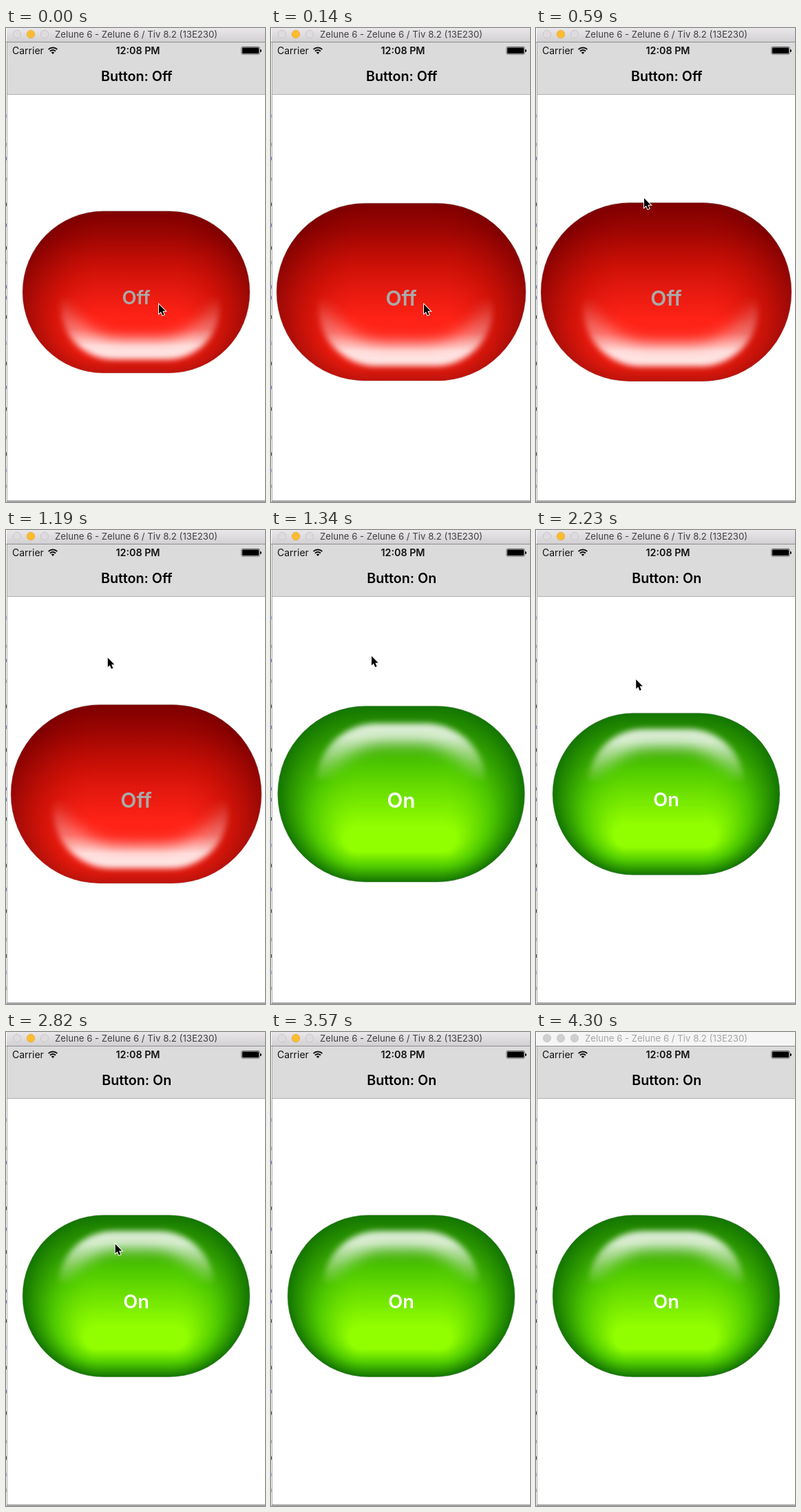
Write an HTML page that moves like this. It is 376 px wide and 688 px high and loops after 4.4 s.

```html
<!DOCTYPE html>
<html lang="en">
<head>
<meta charset="utf-8">
<title>Glossy toggle button</title>
<style>
  html, body { margin: 0; width: 100%; height: 100%; overflow: hidden; background: #fff; }
  svg { display: block; width: 376px; height: 688px; font-family: Inter, Roboto, sans-serif; }
  .mid { text-anchor: middle; }
  .idle .light { fill: #d0cfd0; stroke: #c6c5c6; }
  .idle .bar { fill: #f6f5f6; }
  .idle .caption { fill: #a5a5a5; }
</style>
</head>
<body>
<svg id="stage" viewBox="0 0 376 688">
  <defs>
    <linearGradient id="chrome" x2="0" y2="1">
      <stop stop-color="#e9e7e9"/><stop offset="1" stop-color="#d2d0d2"/>
    </linearGradient>
    <linearGradient id="warm" x2="0" y2="1">
      <stop offset=".15" stop-color="#ff2818" stop-opacity="0"/>
      <stop offset="1" stop-color="#ff2818" stop-opacity=".5"/>
    </linearGradient>
    <linearGradient id="fadeDown" gradientUnits="userSpaceOnUse" x1="0" x2="0" y1="287" y2="368">
      <stop stop-color="#fff" stop-opacity=".86"/>
      <stop offset=".25" stop-color="#fff" stop-opacity=".8"/>
      <stop offset="1" stop-color="#fff" stop-opacity="0"/>
    </linearGradient>
    <linearGradient id="fadeUp" gradientUnits="userSpaceOnUse" x1="0" x2="0" y1="486" y2="388">
      <stop stop-color="#fff" stop-opacity=".92"/>
      <stop offset=".25" stop-color="#fff" stop-opacity=".85"/>
      <stop offset=".5" stop-color="#fff" stop-opacity=".38"/>
      <stop offset="1" stop-color="#fff" stop-opacity="0"/>
    </linearGradient>
    <filter id="soft" filterUnits="userSpaceOnUse" x="0" y="220" width="376" height="320" color-interpolation-filters="sRGB">
      <feGaussianBlur stdDeviation="4"/>
    </filter>
    <filter id="softer" filterUnits="userSpaceOnUse" x="0" y="220" width="376" height="320" color-interpolation-filters="sRGB">
      <feGaussianBlur stdDeviation="10"/>
    </filter>
    <mask id="topGlow" maskUnits="userSpaceOnUse" x="24" y="266" width="330" height="234">
      <rect x="76" y="289" width="226" height="160" rx="80" fill="#fff" filter="url(#soft)"/>
      <rect x="85" y="318" width="208" height="180" rx="84" filter="url(#softer)"/>
    </mask>
    <mask id="lowGlow" maskUnits="userSpaceOnUse" x="24" y="266" width="330" height="234">
      <rect x="80" y="328" width="230" height="153" rx="76" fill="#fff" filter="url(#soft)"/>
      <rect x="88" y="270" width="214" height="178" rx="82" filter="url(#softer)"/>
    </mask>
  </defs>

  <rect width="376" height="688" fill="#fff"/>
  <g id="behind"></g>
  <path d="M1.5 20V687" stroke="#a9a9a9"/>

  <rect class="bar" x="1" width="375" height="20" fill="url(#chrome)"/>
  <g stroke-width=".8">
    <circle class="light" cx="16" cy="9" r="5.7" fill="#dddbdd" stroke="#c3c1c3"/>
    <circle class="light" cx="36" cy="9" r="5.7" fill="#fdbc2f" stroke="#e6a73a"/>
    <circle class="light" cx="56" cy="9" r="5.7" fill="#dddbdd" stroke="#c3c1c3"/>
  </g>
  <text class="caption" x="71" y="14" font-size="13.2" fill="#404040">Zelune 6 - Zelune 6 / Tiv 8.2 (13E230)</text>

  <rect x="2" y="20" width="374" height="76" fill="#dbdbdb"/>
  <path d="M0 20.5H376" stroke="#8f8f8f"/>
  <path d="M2 96.5H376" stroke="#b2b2b2"/>
  <text x="9" y="38" font-size="14" fill="#111">Carrier</text>
  <g fill="none" stroke="#111" stroke-width="2">
    <path d="M61.6 31.1a9 9 0 0 1 12.8 0M64 33.8a5.6 5.6 0 0 1 8 0"/>
    <path d="M68 38l-2.3-2.4a3.2 3.2 0 0 1 4.6 0z" fill="#111" stroke="none"/>
  </g>
  <text class="mid" x="191.5" y="38" font-size="14.3" font-weight="600" fill="#111">12:08 PM</text>
  <rect x="341.9" y="27.4" width="26.2" height="10.7" rx="1.8" fill="none" stroke="#222" stroke-width=".7"/>
  <rect x="343" y="28.5" width="24" height="8.5" rx="1"/>
  <path d="M369 31a2 2 0 0 1 0 4z"/>
  <text id="heading" class="mid" x="189.7" y="77" font-size="19.7" font-weight="600"></text>

  <g id="button">
    <g id="red"></g>
    <g id="green"></g>
    <text id="label" class="mid" x="189" y="401" font-size="27.3" font-weight="600"></text>
  </g>

  <path d="M1 686.5H376" stroke="#777"/>
  <path d="M0 687.5H376" stroke="#c4c4c4"/>
  <path id="cursor" d="M1 1V14.6L4 11.8L6.2 17L8.6 16L6.4 10.8H10.6Z" stroke="#fff" stroke-width="1.9" paint-order="stroke"/>
</svg>
<script>
const LOOP = 4400, PRESS = 140, BEAT = 148.8, IDLE = 4300;
const RELEASE = 9, LEAVE = 24; // in beats
const RINGS = 90, RIM = [24, 265.7, 354, 500.7];
const $ = id => document.getElementById(id);
const mix = (a, b, t) => a + (b - a) * t;

function add(parent, tag, attrs) {
  const el = document.createElementNS('http://www.w3.org/2000/svg', tag);
  for (const k in attrs) el.setAttribute(k, attrs[k]);
  parent.append(el);
}

function ramp(colors, t) {
  const p = t * (colors.length - 1), i = Math.min(colors.length - 2, Math.floor(p));
  return `rgb(${colors[i].map((c, k) => Math.round(mix(c, colors[i + 1][k], p - i)))})`;
}

function pill(parent, [left, top, right, bottom], look) {
  add(parent, 'rect', { x: left, y: top, width: right - left, height: bottom - top, rx: (bottom - top) / 2, ...look });
}

// Nested pills shrink from the rim to a bright core
function dome(group, core, colors, overlays) {
  for (let i = 0; i <= RINGS; i++) {
    const t = i / RINGS;
    pill(group, RIM.map((v, k) => mix(v, core[k], t)), { fill: ramp(colors, t) });
  }
  pill(group, RIM, { fill: 'none', stroke: '#999', 'stroke-opacity': .45, 'stroke-width': .8 });
  for (const look of overlays) pill(group, RIM, look);
}

dome($('red'), [110, 420, 268, 470],
  [[126, 0, 0], [194, 12, 4], [255, 32, 22]],
  [{ fill: 'url(#warm)' }, { fill: 'url(#fadeUp)', mask: 'url(#lowGlow)' }]);
dome($('green'), [114, 427, 262, 460],
  [[20, 118, 0], [80, 202, 0], [146, 255, 0]],
  [{ fill: 'url(#fadeDown)', mask: 'url(#topGlow)' }]);

// Slivers of the window behind, down the left edge
let seed = 7;
const random = () => (seed = seed * 16807 % 2147483647) / 2147483647;
const inks = ['#a9c8f5', '#bbb', '#7a8ad0', '#555'];
for (let y = 125; y < 670; y += 14 + random() * 30)
  add($('behind'), 'rect', { x: 0, y, width: 1.2, height: 5, fill: inks[Math.floor(random() * inks.length)] });

// Pointer path: beat, x, y
const path = [
  [1, 221, 400], [2, 178, 327], [4, 156, 246], [7, 148.5, 187], [9, 145, 182],
  [14, 145, 182], [16, 143.5, 250], [18, 148, 277], [21, 177, 366], [22, 341, 613], [23, 340.5, 615]
];

function pointerAt(beat) {
  const i = path.findIndex(p => p[0] >= beat);
  if (i < 1) return path[i < 0 ? path.length - 1 : 0].slice(1);
  const [a, b] = [path[i - 1], path[i]], t = (beat - a[0]) / (b[0] - a[0]);
  return [mix(a[1], b[1], t), mix(a[2], b[2], t)];
}

// Swells quickly while held, collapses quickly once released
const scaleAt = beat => beat < RELEASE
  ? 1 + .103 * (1 - .06 ** beat)
  : 1 + .087 * .035 ** (beat - RELEASE);

function draw(t) {
  const beat = t < PRESS ? 0 : 1 + Math.floor((t - PRESS) / BEAT);
  const on = beat >= RELEASE, word = on ? 'On' : 'Off';
  $('button').setAttribute('transform', `translate(189 383) scale(${scaleAt(beat)}) translate(-189 -383)`);
  $('red').style.display = on ? 'none' : '';
  $('green').style.display = on ? '' : 'none';
  $('label').textContent = word;
  $('label').setAttribute('fill', on ? '#fff' : '#aaa');
  $('heading').textContent = 'Button: ' + word;
  $('cursor').setAttribute('transform', `translate(${pointerAt(beat)})`);
  $('cursor').style.display = beat < LEAVE ? '' : 'none';
  $('stage').classList.toggle('idle', t >= IDLE);
}

const start = performance.now();
function tick(now) {
  draw(Math.max(0, now - start) % LOOP);
  requestAnimationFrame(tick);
}
draw(0);
requestAnimationFrame(tick);
</script>
</body>
</html>
```
